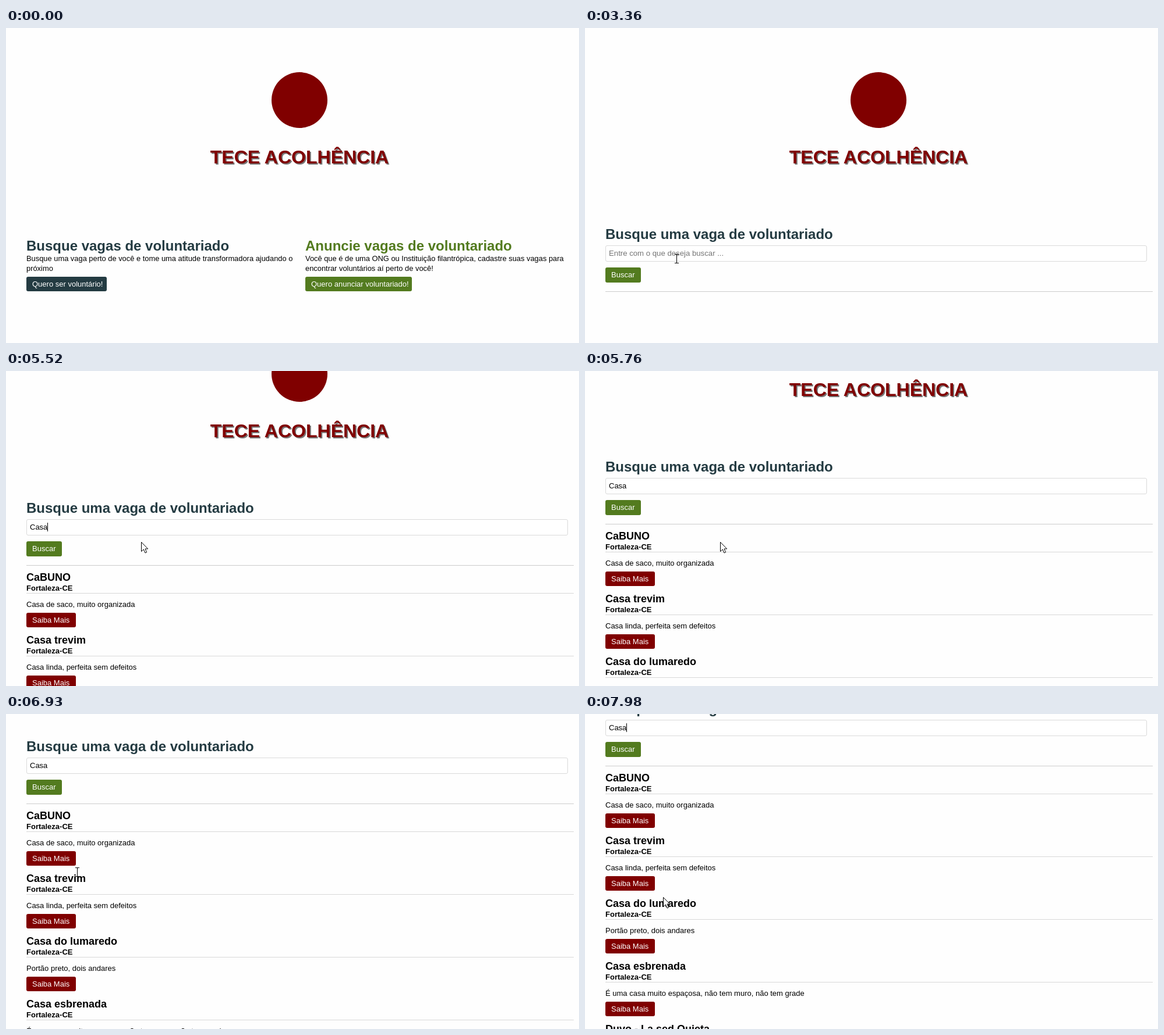
Recreate the animation shown at these times as an HTML page. Size 984 by 542 pixels, loop 8000 ms.

```html
<!DOCTYPE html>
<html lang="pt-BR">
<head>
<meta charset="utf-8">
<title>Vagas de voluntariado</title>
<style>
html, body { margin: 0; width: 100%; height: 100%; overflow: hidden; background: #fefefe; }
svg { display: block; font-family: "Liberation Sans", Arial, sans-serif; }
text { white-space: pre; }
</style>
</head>
<body>
<svg id="stage" width="984" height="542" viewBox="0 0 984 542"></svg>
<script>
const LOOP = 8000, STEP = 30;
const RED = '#800000', GREEN = '#537b1f', DARK = '#243b42';
const LEFT = 35, ROW = 108;
const OPEN = 2010, TYPE = 3720, KEY_GAP = 120, SUBMIT = 4650;

const text = (x, y, s, size = 13, fill = '#000', extra = '') =>
  `<text x="${x}" y="${y}" font-size="${size}" fill="${fill}" ${extra}>${s}</text>`;
const bold = (x, y, s, size, fill) => text(x, y, s, size, fill, 'font-weight="bold"');
const rect = (x, y, w, h, fill, extra = '') =>
  `<rect x="${x}" y="${y}" width="${w}" height="${h}" fill="${fill}" ${extra}/>`;
const button = (x, y, w, h, fill, label) =>
  rect(x, y, w, h, fill, 'rx="3"') + text(x + 10, y + 17, label, 13, '#fff');
const rule = (y, fill) => rect(LEFT, y, 940, 1, fill);
const group = (id, body) => `<g id="${id}">${body}</g>`;

const title = (shift, fill) => text(504 + shift, 233 + shift, 'TECE ACOLHÊNCIA', 32, fill,
  'font-weight="bold" text-anchor="middle"');
const header = `<circle cx="504" cy="124" r="48" fill="${RED}"/>` + title(2, '#777') + title(0, RED);

const card = (x, fill, head, lines, width, label) => bold(x, 383, head, 24, fill) +
  lines.map((s, i) => text(x, 401 + 17 * i, s, 12.88)).join('') +
  button(x, 428, width, 25, fill, label);
const home = card(LEFT, DARK, 'Busque vagas de voluntariado', [
  'Busque uma vaga perto de você e tome uma atitude transformadora ajudando o',
  'próximo'
], 138, 'Quero ser voluntário!') + card(514, GREEN, 'Anuncie vagas de voluntariado', [
  'Você que é de uma ONG ou Instituição filantrópica, cadastre suas vagas para',
  'encontrar voluntários aí perto de você!'
], 183, 'Quero anunciar voluntariado!');

const search = bold(LEFT, 363, 'Busque uma vaga de voluntariado', 24, DARK) +
  rect(35.5, 374.5, 929, 27, '#fff', 'rx="2.5" stroke="#dadada"') +
  text(41, 392, 'Entre com o que deseja buscar ...', 13.2, '#757575', 'id="hint"') +
  text(41, 392, '', 13, '#000', 'id="value"') +
  rect(41, 380, 1, 15, '#000', 'id="caret"') +
  button(LEFT, 412, 61, 26, GREEN, 'Buscar') + rule(453, '#ccc');

const results = [
  ['CaBUNO', 'Casa de saco, muito organizada'],
  ['Casa trevim', 'Casa linda, perfeita sem defeitos'],
  ['Casa do lumaredo', 'Portão preto, dois andares'],
  ['Casa esbrenada', 'É uma casa muito espaçosa, não tem muro, não tem grade'],
  ['Duvo - La sed Quieta', '']
].map(([name, about], i) => {
  const y = 480 + ROW * i;
  return bold(LEFT, y, name, 18) + bold(LEFT, y + 17, 'Fortaleza-CE', 13) +
    rule(y + 21, '#d8d8d8') + text(LEFT, y + 45, about) +
    button(LEFT, y + 55, 85, 25, RED, 'Saiba Mais');
}).join('');

const list = rect(35.5, 402.5, 929, 61, '#fff', 'stroke="#c4c4c4"') + text(41, 417, 'Casa');

const shape = d => `<path d="${d}" fill="#fff" stroke="#000" stroke-linejoin="round"/>`;
const pointers = {
  arrow: shape('M.5 .5V16.5L4.3 13L7 19L9.6 17.9L7 12H11.7Z'),
  hand: shape('M-1.5 13V2Q0-.5 1.5 2V8Q8 6 10.5 11V16L8.5 21.5H-.5L-5 14Q-5.5 11-3 12Z'),
  beam: '<path d="M-3-7.5H4M.5-7.5V7.5M-3 7.5H4" fill="none" stroke="#000"/>'
};

document.getElementById('stage').innerHTML =
  group('page', header + group('home', home) +
    group('search', search + group('results', results) + group('list', list))) +
  group('pointer', Object.entries(pointers).map(([id, p]) => group(id, p)).join(''));

const el = id => document.getElementById(id);
const show = (id, on) => el(id).setAttribute('visibility', on ? 'inherit' : 'hidden');
const move = (id, x, y) => el(id).setAttribute('transform', `translate(${x} ${y})`);

const clamp = v => Math.max(0, Math.min(1, v));
const linear = v => v;
const speedUp = v => v * v;
const smooth = v => v * v * (3 - 2 * v);

// Pointer moves: start, end, x, y, easing, pointer while moving, pointer at rest
const entry = { time: 270, x: 951, y: 65 };
const moves = [
  [270, 450, 400, 231, speedUp, 'arrow', 'arrow'],
  [450, 1050, 109, 442, linear, 'arrow', 'hand'],
  [OPEN, 2370, 157, 397, smooth, 'arrow', 'beam'],
  [4950, 4980, 197, 379, linear, 'beam', 'beam'],
  [4980, 5520, 232, 294, smooth, 'arrow', 'arrow'],
  [6030, 6420, 115, 262, smooth, 'arrow', 'arrow'],
  [6420, 6690, 130, 228, smooth, 'arrow', 'arrow'],
  [6690, 6930, 122, 272, smooth, 'arrow', 'beam'],
  [6960, 7980, 134, 315, smooth, 'arrow', 'arrow']
];

function pointerAt(t) {
  let { x, y } = entry, kind = 'arrow';
  for (const [start, end, toX, toY, ease, moving, rest] of moves) {
    if (t < start) break;
    const u = clamp((t - start) / (end - start)), k = ease(u);
    x += (toX - x) * k;
    y += (toY - y) * k;
    kind = u < 1 ? moving : rest;
  }
  return { x: Math.round(x), y: Math.round(y), kind };
}

// Each wheel notch (start, duration) scrolls 100 px
const notches = [[5070, 310], [5392, 460], [6615, 336], [7782, 334]];
const scrollAt = t => Math.round(notches.reduce(
  (sum, [start, time]) => sum + 100 * smooth(clamp((t - start) / time)), 0));

function caretOn(t) {
  if (t < OPEN) return false;
  if (t >= TYPE && t < 5070) return t < 4290;
  const origin = t < TYPE ? 1920 : 5070;
  return (t - origin) % 960 < 480;
}

function draw(t) {
  move('page', 0, -scrollAt(t));
  show('home', t < OPEN);
  show('search', t >= OPEN);
  show('results', t >= SUBMIT);
  show('list', t >= TYPE + STEP && t < SUBMIT);

  const typed = Math.max(0, Math.min(4, Math.floor((t - TYPE) / KEY_GAP) + 1));
  show('hint', !typed);
  el('value').textContent = 'Casa'.slice(0, typed);
  el('caret').setAttribute('x', 41 + Math.round(typed ? el('value').getComputedTextLength() : 0));
  show('caret', caretOn(t));

  const { x, y, kind } = pointerAt(t);
  show('pointer', t >= entry.time);
  for (const id in pointers) show(id, id === kind);
  // The hand's hot spot is its fingertip
  move('pointer', x + (kind === 'hand' ? 9 : 0), y + (kind === 'hand' ? 2 : 0));
}

function tick() {
  const t = performance.now() % LOOP;
  draw(Math.floor(t / STEP) * STEP);
  requestAnimationFrame(tick);
}
tick();
</script>
</body>
</html>
```
